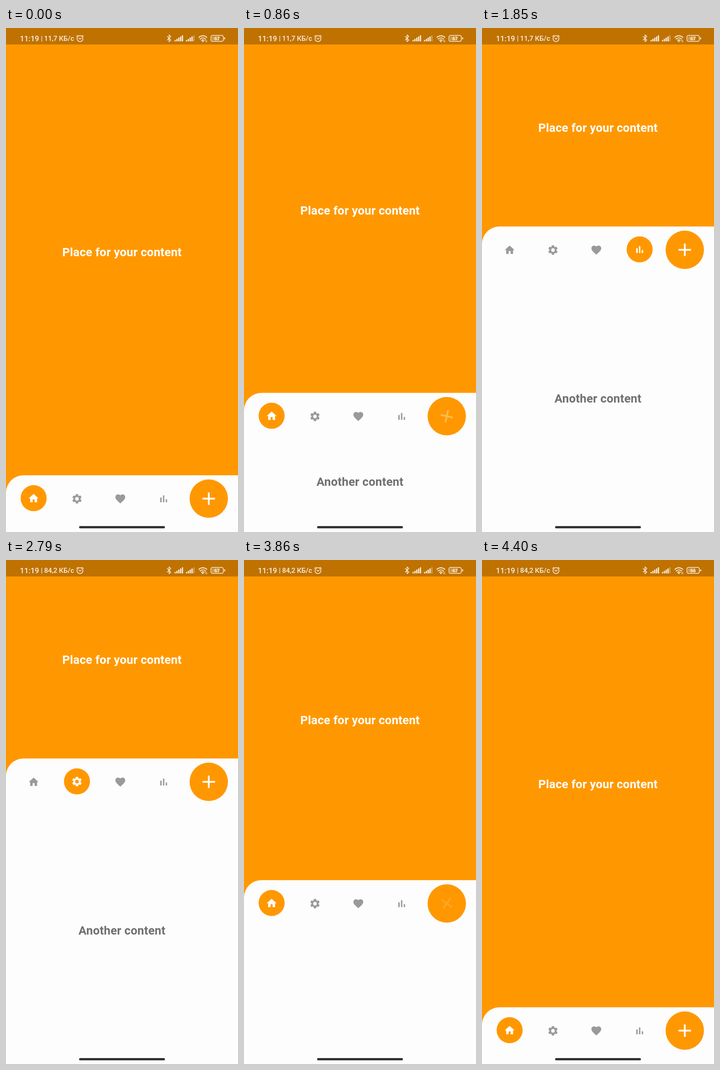
Recreate the animation shown at these times as an HTML page. Size 508 by 1102 pixels, loop 4.52 s.

```html
<!DOCTYPE html>
<html lang="en">
<head>
<meta charset="utf-8">
<title>Expandable bottom bar</title>
<style>
  html, body { margin: 0; width: 100%; height: 100%; overflow: hidden; background: #ff9800; }
  svg { display: block; width: 100vw; height: 100vh; font-family: Roboto, sans-serif; }
  .title { font-size: 25.87px; font-weight: 700; letter-spacing: .19px; text-anchor: middle; }
  .line { fill: none; stroke: #fbf1e2; stroke-width: 1.5; stroke-linecap: round; stroke-linejoin: round; }
</style>
</head>
<body>
<svg viewBox="0 0 508 1102">
  <rect width="508" height="1102" fill="#ff9800"/>
  <text id="main" class="title" x="254" fill="#fff">Place for your content</text>

  <g id="panel">
    <path d="M0 1200V38A38 38 0 0 1 38 0H508V1200Z" fill="#fdfdfd"/>
    <circle id="spot" cy="50" r="28.5" fill="#ff9800"/>
    <g id="icons"></g>
    <g transform="translate(444 51)">
      <circle r="42" fill="#ff9800"/>
      <circle id="ripple" fill="#f58000"/>
      <path id="plus" d="M-13.6 0H13.6M0 -13.6V13.6" stroke="#fff" stroke-width="3.88"/>
    </g>
  </g>
  <text id="extra" class="title" x="254" fill="#707070">Another content</text>
  <rect x="160" y="1089" width="188" height="5" rx="2.5" fill="#333"/>

  <rect width="508" height="36" fill="#bf7200"/>
  <g fill="#fbf1e2" font-weight="500">
    <text x="30.5" y="28.5" font-size="16.5">11:19</text>
    <text x="76.5" y="28" font-size="15">|</text>
    <text id="speed" x="83.5" y="28" font-size="15"></text>
    <g class="line">
      <circle cx="162" cy="23.3" r="6.5"/>
      <path d="M154.5 18.5L157.5 16M169.5 18.5L166.5 16M159.5 22L162 24.5L165 22"/>
      <path d="M353 18.5L361 26.5L357 30V15L361 18.5L353 26.5" stroke-width="1.4"/>
      <path d="M422.3 20.5A12.5 12.5 0 0 1 439.7 20.5M425 24A8.6 8.6 0 0 1 437 24M428 27A4.6 4.6 0 0 1 434 27" stroke-width="1.8"/>
      <path d="M437 26V30M439.5 27V31" stroke-width="1"/>
      <rect x="448.8" y="16.3" width="27" height="13" rx="3.5"/>
    </g>
    <circle cx="431" cy="29.2" r="1.6"/>
    <g id="signal"></g>
    <rect x="451" y="18.5" width="16" height="8.6" rx="1.5" opacity=".35"/>
    <rect x="477.6" y="20.5" width="2.2" height="4.6" rx="1"/>
    <text id="charge" x="462.3" y="26.7" font-size="10.5" font-weight="700" text-anchor="middle"></text>
  </g>
</svg>
<script>
const LOOP = 4520;
const CLOSED = 978, OPEN = 434;
const TABS = [60.5, 155.4, 250.3, 345.2];
const SHAPES = [
  'M10 20v-6h4v6h5v-8h3L12 3 2 12h3v8z',
  'M19.14 12.94c.04-.3.06-.61.06-.94s-.02-.64-.07-.94l2.03-1.58c.18-.14.23-.41.12-.61l-1.92-3.32c-.12-.22-.37-.29-.59-.22l-2.39.96c-.5-.38-1.03-.7-1.62-.94L14.4 2.81c-.04-.24-.24-.41-.48-.41h-3.84c-.24 0-.43.17-.47.41l-.36 2.54c-.59.24-1.13.57-1.62.94l-2.39-.96c-.22-.08-.47 0-.59.22L2.74 8.87c-.12.21-.08.47.12.61l2.03 1.58c-.05.3-.09.63-.09.94s.02.64.07.94l-2.03 1.58c-.18.14-.23.41-.12.61l1.92 3.32c.12.22.37.29.59.22l2.39-.96c.5.38 1.03.7 1.62.94l.36 2.54c.05.24.24.41.48.41h3.84c.24 0 .44-.17.47-.41l.36-2.54c.59-.24 1.13-.56 1.62-.94l2.39.96c.22.08.47 0 .59-.22l1.92-3.32c.12-.22.07-.47-.12-.61zM12 15.6a3.6 3.6 0 1 1 0-7.2 3.6 3.6 0 0 1 0 7.2z',
  'M12 21.35l-1.45-1.32C5.4 15.36 2 12.28 2 8.5 2 5.42 4.42 3 7.5 3c1.74 0 3.41.81 4.5 2.09C13.09 3.81 14.76 3 16.5 3 19.58 3 22 5.42 22 8.5c0 3.78-3.4 6.86-8.55 11.54z',
  'M5 9.2h3V19H5zM10.6 5h2.8v14h-2.8zM16.2 13H19v6h-2.8z'
];
// Tab selections: [time, tab index]
const PICKS = [[0, 0], [1850, 3], [2180, 2], [2790, 1], [3160, 0]];
const TOGGLES = [
  { press: 370, start: 666, release: 666, spin: 676 },
  { press: 3490, start: 3626, release: 3715, spin: 3652 }
];

const el = id => document.getElementById(id);
const clamp = x => Math.min(1, Math.max(0, x));
const smooth = x => { x = clamp(x); return x * x * (3 - 2 * x); };

function add(parent, tag, attrs) {
  const node = document.createElementNS('http://www.w3.org/2000/svg', tag);
  for (const key in attrs) node.setAttribute(key, attrs[key]);
  return parent.appendChild(node);
}

// Standard ease, cubic-bezier(.4, 0, .2, 1)
function ease(x) {
  x = clamp(x);
  let lo = 0, hi = 1;
  for (let i = 0; i < 24; i++) {
    const s = (lo + hi) / 2, r = 1 - s;
    if (1.2 * r * r * s + .6 * r * s * s + s * s * s < x) lo = s; else hi = s;
  }
  return smooth(lo);
}

const icons = SHAPES.map(d => add(el('icons'), 'path', { d }));

for (const x of [369, 394]) {
  for (let i = 0; i < 5; i++) {
    const h = 3 + i * 2.6;
    add(el('signal'), 'rect', {
      x: x + i * 4, y: 29.3 - h, width: 2.7, height: h, rx: .6,
      opacity: x > 380 && i === 4 ? .4 : 1
    });
  }
}

function drawTabs(t) {
  const active = PICKS.filter(p => p[0] <= t).pop()[1];
  el('spot').setAttribute('cx', TABS[active]);
  icons.forEach((icon, i) => {
    const on = i === active;
    icon.setAttribute('fill', on ? '#fff' : '#9a9a9a');
    icon.setAttribute('transform',
      `translate(${TABS[i]} ${on ? 50.5 : 51.5}) scale(1.078) translate(-12 -12)`);
  });
}

function drawButton(t) {
  const { press, start, release, spin } = TOGGLES[t < 2400 ? 0 : 1];
  const age = t - start;
  const angle = 360 * smooth((t - spin) / 525);
  const alpha = 1 - .9 * (smooth((age - 60) / 200) - smooth((age - 490) / 250));
  el('plus').setAttribute('transform', `rotate(${angle})`);
  el('plus').setAttribute('opacity', alpha);
  el('ripple').setAttribute('r', 25 + 17 * ease((t - press) / 225));
  el('ripple').setAttribute('opacity', clamp((t - press) / 75) * (1 - clamp((t - release) / 150)));
}

function draw(t) {
  const [open, close] = TOGGLES.map(g => ease((t - g.start) / 680));
  const top = CLOSED + (OPEN - CLOSED) * (open - close);
  el('panel').setAttribute('transform', `translate(0 ${top})`);
  el('main').setAttribute('y', top / 2 + 9.5);
  el('extra').setAttribute('y', top / 2 + 602);
  el('extra').setAttribute('visibility', t >= 740 && t < 3640 ? 'visible' : 'hidden');
  el('speed').textContent = t < 2180 ? '11,7 КБ/с' : '84,2 КБ/с';
  el('charge').textContent = t < 4400 ? '67' : '66';
  drawTabs(t);
  drawButton(t);
}

const begin = performance.now();
function tick() {
  draw((performance.now() - begin) % LOOP);
  requestAnimationFrame(tick);
}
draw(0);
requestAnimationFrame(tick);
</script>
</body>
</html>
```
